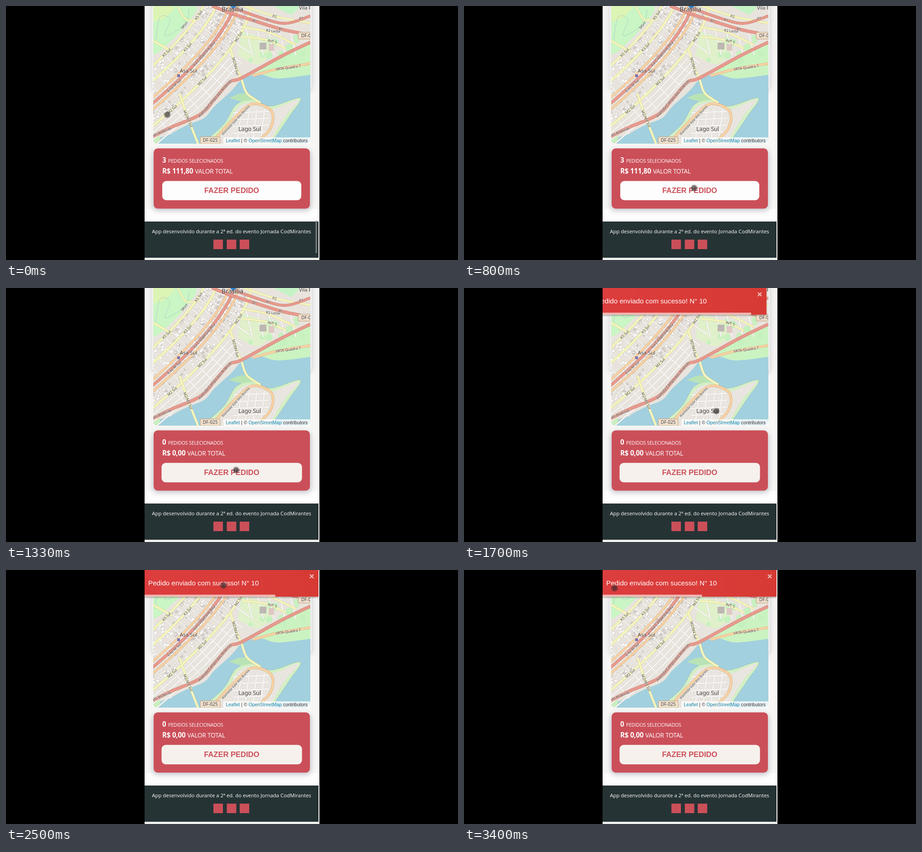
Animation of 998x561 px, one loop 3.43 s. Source, as an HTML page:

```html
<!DOCTYPE html>
<html lang="pt-BR">
<head>
<meta charset="utf-8">
<title>Pedido</title>
<style>
  html, body { margin: 0; width: 100%; height: 100%; overflow: hidden; background: #000; }
  svg { display: block; width: 100vw; height: 100vh; }
  .map { font-family: "Noto Sans", sans-serif; fill: #3a3532; text-anchor: middle;
    paint-order: stroke; stroke: #ffffff90; stroke-width: 1.2px; }
  .open { font-family: "Open Sans", sans-serif; fill: #fff; }
  .order { font-size: 15.1px; font-weight: 700; letter-spacing: -.2px; }
  .order .small { font-size: 10.65px; font-weight: 400; }
  .order .large { font-size: 13.7px; font-weight: 400; }
  .arial { font-family: "Liberation Sans", Arial, sans-serif; }
</style>
</head>
<body>
<svg viewBox="0 0 998 561">
  <defs>
    <clipPath id="screen"><rect x="306" width="386" height="561"/></clipPath>
    <clipPath id="mapArea"><rect x="325" y="-20" width="347" height="324" rx="10"/></clipPath>
    <clipPath id="bannerArea"><rect x="306" width="384" height="80"/></clipPath>
    <filter id="blur" x="-20%" y="-20%" width="140%" height="140%"><feGaussianBlur stdDeviation="6"/></filter>
    <filter id="soft" x="-50%" y="-50%" width="200%" height="200%"><feGaussianBlur stdDeviation=".9"/></filter>
    <linearGradient id="red"><stop stop-color="#dc3d3e"/><stop offset="1" stop-color="#d73a34"/></linearGradient>
    <pattern id="lots" width="6" height="4" patternUnits="userSpaceOnUse" patternTransform="rotate(24)">
      <path d="M0 0H6M0 0V4" fill="none" stroke="#faf8f5"/>
    </pattern>
  </defs>
  <g clip-path="url(#screen)">
    <rect x="306" width="386" height="561" fill="#f7f6f4"/>
    <rect x="306" y="448" width="386" height="113" fill="#fdfdfd"/>
    <rect x="321" y="-30" width="356" height="218" rx="10" fill="#c9c9cd" opacity=".75" filter="url(#blur)"/>
    <rect x="322" y="-30" width="353" height="215" rx="9" fill="#f0eff0"/>
    <g id="map" clip-path="url(#mapArea)"></g>
    <rect x="480" y="290" width="192" height="14" fill="#fff" opacity=".75"/>
    <text class="arial" x="666" y="301" font-size="10.4" text-anchor="end" fill="#333"><tspan fill="#1684a8">Leaflet</tspan> | © <tspan fill="#1684a8">OpenStreetMap</tspan> contributors</text>

    <rect x="324" y="318" width="349" height="134" rx="10" fill="#a5a5b0" opacity=".65" filter="url(#blur)"/>
    <rect x="326" y="314.5" width="345" height="133" rx="9" fill="#cb4f59"/>
    <text class="open order" x="345" y="346"><tspan id="count"></tspan><tspan dx="4.5" class="small">PEDIDOS SELECIONADOS</tspan></text>
    <text class="open order" x="345" y="370"><tspan id="total"></tspan><tspan dx="4" class="large">VALOR TOTAL</tspan></text>
    <g id="button">
      <rect id="face" x="345" y="386.5" width="307" height="42.5" rx="9"/>
      <text id="caption" class="arial" x="498.3" y="413" font-size="16.4" font-weight="700" text-anchor="middle">FAZER PEDIDO</text>
    </g>

    <rect x="306" y="476" width="384" height="80" fill="#263335"/>
    <rect x="306" y="556" width="386" height="5" fill="#eceeea"/>
    <text class="open" x="498" y="502" font-size="11.37" text-anchor="middle">App desenvolvido durante a 2ª ed. do evento Jornada CodMirantes</text>
    <path d="M458 516h21v21h-21zm29.5 0h21v21h-21zm28.500 0h21v21h-21z" fill="#cb4f59"/>
    <rect id="scrollbar" x="683.5" y="474" width="3" height="72" rx="1.5" fill="#7b8080"/>

    <g clip-path="url(#bannerArea)">
      <g id="banner">
        <rect x="306" y="2" width="384" height="60" fill="#555" opacity=".3" filter="url(#soft)"/>
        <rect x="306" width="384" height="59" fill="url(#red)"/>
        <rect id="progress" x="306" y="54.5" height="4.5" fill="#f2b9b5"/>
        <text class="arial" x="314" y="34" font-size="15.2" fill="#fff">Pedido enviado com sucesso! N° 10</text>
        <path d="M671 10l8 8m0-8l-8 8" stroke="#f3cbc8" stroke-width="1.9"/>
      </g>
    </g>
    <circle id="pointer" r="6.8" fill="#302f2f" filter="url(#soft)"/>
  </g>
</svg>
<script>
const $ = id => document.getElementById(id);
const parts = [];
const add = s => parts.push(s);

let seed = 7;
const random = () => (seed = seed * 16807 % 2147483647) / 2147483647;
const between = (a, b) => a + (b - a) * random();

// Smooth curve through every point
function curve(points) {
  const p = points.split(' ').map(s => s.split(',').map(Number));
  const at = i => p[Math.max(0, Math.min(p.length - 1, i))];
  const handle = (i, side) => at(i).map((v, k) => v + side * (at(i + 1)[k] - at(i - 1)[k]) / 6);
  return 'M' + p[0] + p.slice(1).map((end, i) => `C${handle(i, 1)} ${handle(i + 1, -1)} ${end}`).join('');
}
const area = (points, fill, extra = '') => add(`<path d="${curve(points)}" fill="${fill}" ${extra}/>`);
function road(points, width, fill, edge) {
  area(points, 'none', `stroke="${edge}" stroke-width="${width + 1.2}"`);
  area(points, 'none', `stroke="${fill}" stroke-width="${width}"`);
}
const white = (points, w = 2) => road(points, w, '#fff', '#d6d1cb');
const yellow = (points, w = 4) => road(points, w, '#f7f7bd', '#d3d097');
const orange = (points, w = 4.5) => road(points, w, '#f8d2a5', '#d3aa7d');
const salmon = (points, w = 6) => road(points, w, '#e69a8d', '#c87d70');

function label(text, x, y, angle = 0, size = 8) {
  add(`<text class="map" transform="translate(${x} ${y}) rotate(${angle})" y="${size * .36}" font-size="${size}">${text}</text>`);
}
function shield(text, x, y, w) {
  add(`<rect x="${x}" y="${y}" width="${w}" height="15" rx="2" fill="#f1dfc9" stroke="#b99d7c"/>`);
  label(text, x + w / 2, y + 7.5, 0, 10);
}

// The avenues of the south wing run beside one curved axis:
// u goes along it, d is the distance to its lower right
function wing(u, d) {
  const v = 1 - u;
  const tx = v * 190 + u * 29, ty = v * -156 + u * -92, len = Math.hypot(tx, ty);
  return {
    x: v * v * 285 + 2 * u * v * 475 + u * u * 504 - d * ty / len,
    y: v * v * 248 + 2 * u * v * 92 + d * tx / len,
    angle: Math.atan2(ty, tx) * 180 / Math.PI
  };
}
const point = (u, d) => { const p = wing(u, d); return `${p.x.toFixed(1)},${p.y.toFixed(1)}`; };
const avenue = d => [-.3, 0, .3, .6, .9, 1.2].map(u => point(u, d)).join(' ');
const across = (u, from, to) => `${point(u, from)} ${point(u, to)}`;
function wingLabel(text, u, d) {
  const p = wing(u, d);
  label(text, p.x, p.y, p.angle);
}

function drawMap() {
  add('<rect x="325" width="347" height="304" fill="#e8e4dd"/>');

  // Parks
  area('325,0 418,0 395,45 345,96 325,108', '#caf5c4');
  area('325,0 372,0 350,26 325,34', '#dcf4b4');
  area('520,55 590,85 560,128 512,110', '#dff0ca');
  area('545,152 610,112 672,86 672,152 600,160', '#cbf3c1');
  area('590,0 645,0 630,20', '#c6f3c6');
  for (let i = 0; i < 14; i++)
    add(`<circle cx="${between(540, 665)}" cy="${between(62, 125)}" r="${between(3, 9)}" fill="#c6f1bf"/>`);
  area('330,78 340,25 362,30 352,66 396,40 404,8', 'none', 'stroke="#6d91dc" stroke-dasharray="1.5 3"');

  // Lake and peninsula
  area('672,152 600,160 560,151 524,160 495,190 460,222 438,247 400,263 365,282 335,304 672,304', '#a2d0de');
  const shore = '432,304 480,262 508,218 545,207 585,221 650,203 625,245 585,304';
  area(shore, '#d3efc4', 'stroke="#7797a3" stroke-width=".7" stroke-dasharray="3 2"');
  const town = '446,304 490,260 515,222 550,213 585,229 645,207 615,246 580,304';
  area(town, '#e5e0da');
  area(town, 'url(#lots)');
  area('492,203 522,193 550,204 520,211', '#b9e3b5');
  area('325,291 340,289 335,304 325,304', '#c9efbd');

  // Blocks and side streets
  for (let i = 0; i < 480; i++) {
    const { x, y, angle } = wing(between(0, .95), between(-60, 34));
    const size = between(2, 5.5), fill = random() < .75 ? '#fff' : '#d3cdc9';
    add(`<rect width="${size + 2}" height="${size}" transform="translate(${x} ${y}) rotate(${angle})" fill="${fill}" stroke="#bab2ae" stroke-width=".6"/>`);
  }
  for (let u = 0; u < .95; u += .055) white(across(u, -56, 34), 1.5);
  for (let u = -.1; u < .75; u += .09) white(across(u, 42, 78));
  for (const d of [50, 62, 74]) white(across(0, d, d) + ' ' + point(.3, d) + ' ' + point(.6, d));
  for (let x = 520; x < 575; x += 17) white(`${x},228 ${x - 8},290`);
  for (let y = 236; y < 285; y += 15) white(`502,${y} 580,${y - 3}`);
  for (let x = 530; x < 640; x += 24) white(`${x},50 ${x + 14},108`);
  add('<path d="M560 81h15v15h-15z" fill="#bcb7b2"/><path d="M580 84h12v15h-12z" fill="#dfc8c3"/>');

  // Main roads
  yellow('325,77 367,101');
  yellow('379,0 398,30 427,28', 3);
  for (const d of [-62, -37, 38]) yellow(avenue(d));
  for (const d of [-10, 10]) orange(avenue(d), 4);
  salmon(avenue(0), 5.5);
  yellow('520,46 580,58 640,86', 3.5);
  yellow('522,68 575,75 618,94', 3.5);
  yellow('525,0 595,23 672,38', 3.5);
  yellow('495,92 508,135 520,162 532,193 562,214');
  yellow('383,194 402,248 424,304');
  salmon('455,0 500,17 549,33 607,51 650,60', 6);
  salmon('503,5 579,31 622,38 672,22', 5);
  salmon('325,288 364,268 428,240 461,205 494,168 520,159 610,110 672,80');
  orange('545,154 600,139 672,127');
  orange('452,304 505,247 545,216 586,232 584,270 550,304');

  add('<rect x="378" y="151" width="6" height="6" fill="#7770b5"/>');
  add('<path d="M495 0H509L502 8Z" fill="#2c80c8"/>');

  wingLabel('K5 Sul', .35, -62);
  wingLabel('K5 Sul', .73, -62);
  wingLabel('K3 Sul', .47, -37);
  wingLabel('Via Campestre Alta', .51, 0);
  wingLabel('Eixo M Sul', .25, 2);
  for (const u of [.16, .38, .76]) wingLabel('M2 Sul', u, 38);
  label('SKVT', 394, 43, -45);
  label('M2/M4 Sul', 507, 133, 76);
  label('M2/M3 Sul', 402, 249, 66);
  label('Avenida Campo das Aroeiras', 461, 204, -49);
  label('das Aroeiras', 343, 278, -22);
  label('Alameda Vale dos Buritis', 507, 252, -47, 7.5);
  label('VRTA Quadra 7', 623, 136, -8);
  label('P2', 593, 23, 12);
  label('P1', 579, 31, 14);
  label('P1', 652, 27, -12);
  label('R1', 549, 33, 14);
  label('R1', 607, 51, 12);
  label('R2 Leste', 590, 55, 5);
  label('AVT 5', 588, 78, 14);
  label('Brasília', 500, 7, 0, 14);
  label('Vila P', 661, 4, 0, 11);
  label('Asa Sul', 403, 143, 0, 11.5);
  label('Lago Sul', 538, 271, 0, 12.5);
  shield('DF-0', 645, 58, 35);
  shield('DF-025', 429, 289, 44);
  $('map').innerHTML = parts.join('');
}

const LOOP = 3430, PRESS = 850, RELEASE = 1180, SENT = 1278, BOUNCE = 700;
// [time, x, y]
const trail = [[0, 356, 240], [60, 356, 240], [460, 508, 402], [1380, 508, 402], [1700, 557, 272],
  [2160, 620, 249], [2490, 481, 34], [2750, 325, 38], [3260, 325, 40], [LOOP, 333, 40]];
// [progress, x]
const bounce = [[0, 3000], [.6, -25], [.75, 10], [.9, -5], [1, 0]];

const smooth = u => u * u * (3 - 2 * u);
const easeOut = u => 1 - (1 - u) ** 3;

function animate(keys, at, ease) {
  const i = Math.max(1, keys.findIndex(k => k[0] >= at));
  const [from, ...a] = keys[i - 1], [to, ...b] = keys[i];
  const u = ease((at - from) / (to - from));
  return a.map((v, k) => v + (b[k] - v) * u);
}
function set(id, attributes) {
  for (const name in attributes) $(id).setAttribute(name, attributes[name]);
}

function render(t) {
  const pressed = t >= PRESS && t < RELEASE, sent = t >= SENT;
  set('pointer', { transform: `translate(${animate(trail, t, smooth)})`, opacity: pressed ? .82 : .68 });
  set('scrollbar', { opacity: Math.max(0, Math.min(1, (360 - t) / 200)) });

  $('count').textContent = sent ? '0' : '3';
  $('total').textContent = sent ? 'R$ 0,00' : 'R$ 111,80';
  set('face', { fill: pressed ? '#a5d8e5' : t < PRESS ? '#fdfdfd' : '#f6f1ed' });
  set('caption', { fill: pressed ? '#987b8c' : '#cb4f59' });
  set('button', { transform: t < PRESS ? '' : 'translate(498.5 407.7) scale(1.01) translate(-498.5 -407.7)' });

  set('banner', { visibility: sent ? 'visible' : 'hidden' });
  if (!sent) return;
  const p = Math.min(1, (t - SENT) / BOUNCE);
  set('banner', { transform: `translate(${animate(bounce, p, easeOut)} 0)`, opacity: Math.min(1, p / .6) });
  set('progress', { width: 384 * (1 - (t - SENT + 20) / 5000) });
}

drawMap();
const start = performance.now();
(function tick() {
  render((performance.now() - start) % LOOP);
  requestAnimationFrame(tick);
})();
</script>
</body>
</html>
```
